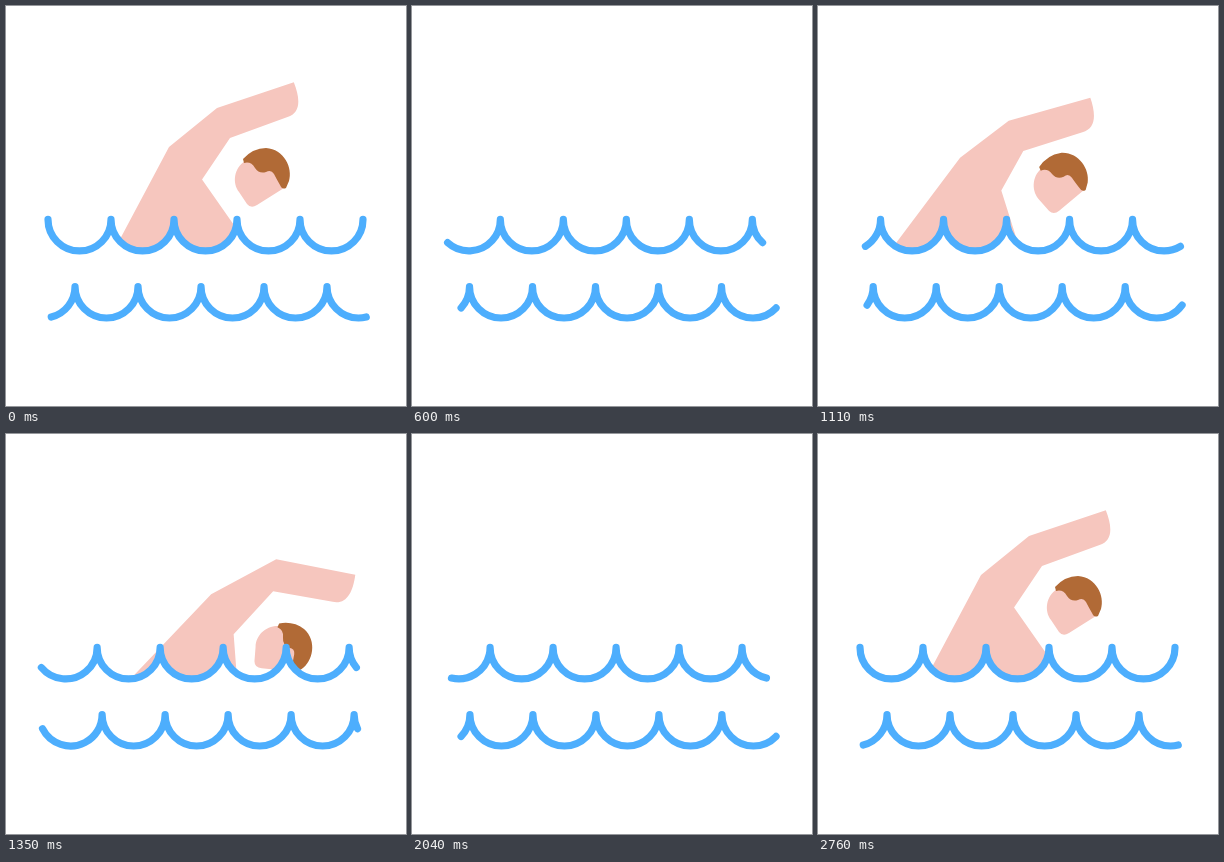
Write an HTML page with a canvas that moves like this. It is 400 px wide and 400 px high and loops after 4790 ms.

```html
<!DOCTYPE html>
<html lang="en">
<head>
<meta charset="utf-8">
<title>Swimmer</title>
<style>
  html, body { margin: 0; width: 100%; height: 100%; overflow: hidden; background: #fff; }
  canvas { display: block; width: 400px; height: 400px; }
</style>
</head>
<body>
<canvas id="stage" width="400" height="400"></canvas>
<script>
const ctx = document.getElementById('stage').getContext('2d');
const LOOP = 4790, STEP = 30, LAST = 92;
const BLUE = '#4daefd', SKIN = '#f6c6be', HAIR = '#b16a36';
const R = 31.5, PITCH = 2 * R, SCALLOPS = 5;
const RISE = -66, DIVE = 47;
const rad = deg => deg * Math.PI / 180;
const frac = v => v - Math.floor(v);

// Monotone cubic through a few [x, y] points
function through(...pts) {
  const slope = i => (pts[i + 1][1] - pts[i][1]) / (pts[i + 1][0] - pts[i][0]);
  const tangent = i => {
    if (i === 0) return slope(0);
    if (i === pts.length - 1) return slope(i - 1);
    const a = slope(i - 1), b = slope(i);
    return a * b > 0 ? 2 * a * b / (a + b) : 0;
  };
  return x => {
    let i = 0;
    while (i < pts.length - 2 && x > pts[i + 1][0]) i++;
    const [x0, y0] = pts[i], [x1, y1] = pts[i + 1];
    const h = x1 - x0, t = (x - x0) / h, q = 1 - t;
    return y0 * q * q * (1 + 2 * t) + y1 * t * t * (3 - 2 * t)
         + h * t * q * (tangent(i) * q - tangent(i + 1) * t);
  };
}

// Scallops travelled: both waves slow down, the lower one overshoots
const upperTravel = through([0, 0], [12, 1.43], [28, 3], [45, 4.22], [57, 5.02], [77, 5.68], [92, 6]);
const lowerTravel = through([0, 0], [12, 1.43], [28, 2.78], [45, 3.57], [57, 4.19], [77, 4.15], [92, 4]);

// Two strokes, slowing at the end; result in -180..180 degrees, 0 = arm highest
function strokeAngle(s) {
  const deg = 720 * s + 450 * s * s * (1 - s);
  return (deg + 180) % 360 - 180;
}

// Circular swing a + b cos + c sin with given values at RISE, 0 and DIVE
function swing(rise, high, dive) {
  const c1 = Math.cos(rad(RISE)) - 1, s1 = Math.sin(rad(RISE));
  const c2 = Math.cos(rad(DIVE)) - 1, s2 = Math.sin(rad(DIVE));
  const det = c1 * s2 - c2 * s1;
  const b = ((rise - high) * s2 - (dive - high) * s1) / det;
  const c = ((dive - high) * c1 - (rise - high) * c2) / det;
  return deg => high + b * (Math.cos(rad(deg)) - 1) + c * Math.sin(rad(deg));
}
const orbit = (xs, ys) => {
  const x = swing(...xs), y = swing(...ys);
  return deg => [x(deg), y(deg)];
};

const shoulderAt = orbit([127, 163, 205], [190, 141, 160]);
const elbowAt = orbit([190, 211, 270], [161, 102, 125]);
const innerAt = orbit([196, 224, 267], [193, 132, 157]);
const headAt = orbit([213, 237, 273], [206, 153, 189]);
const forearm = swing(12.4, -18.5, 10.7);
const reach = swing(93, 81, 80.5);
const tilt = swing(4, 0, 38);

// Point at a distance along a direction and across it
function offset([x, y], deg, along, across = 0) {
  const c = Math.cos(rad(deg)), s = Math.sin(rad(deg));
  return [x + c * along - s * across, y + s * along + c * across];
}

function scallop(left, y, from, to) {
  ctx.arc(left + R, y, R, Math.PI * (1 - from), Math.PI * (1 - to), true);
}

function wave(x, y, u) {
  const left = x - PITCH * u;
  ctx.beginPath();
  scallop(left, y, u, 1);
  for (let k = 1; k < SCALLOPS; k++) scallop(left + k * PITCH, y, 0, 1);
  scallop(left + SCALLOPS * PITCH, y, 0, u);
  ctx.lineWidth = 7.2;
  ctx.lineCap = ctx.lineJoin = 'round';
  ctx.strokeStyle = BLUE;
  ctx.stroke();
}

function clipAboveWave(x, y, u) {
  const left = x - PITCH * u;
  ctx.beginPath();
  ctx.moveTo(left - PITCH, 0);
  for (let k = -1; k < 7; k++) scallop(left + k * PITCH, y, 0, 1);
  ctx.lineTo(left + 7 * PITCH, 0);
  ctx.clip();
}

function fillPath(color, path) {
  ctx.fillStyle = color;
  ctx.fill(path);
}

const face = new Path2D('M239 155C228 162 226 177 233 186L241 198Q245 203 251 199L278 182L270 158Z');
const hair = new Path2D('M237 153Q247 142 260 142C278 143 287 162 283 175L280 182Q276 184 274 179' +
  'Q270 172 268 168Q265 163 260 166Q253 168 249 162Q245 155 238 157Z');

function head([x, y], deg) {
  ctx.save();
  ctx.translate(x, y);
  ctx.rotate(rad(deg));
  ctx.translate(-237, -153);
  fillPath(SKIN, face);
  fillPath(HAIR, hair);
  ctx.restore();
}

function swimmer(a) {
  const lean = Math.abs(a);
  const shoulder = shoulderAt(a), elbow = elbowAt(a), inner = innerAt(a);
  // Past the dive everything ahead of the shoulder plunges deeper
  const plunge = Math.max(0, a - DIVE) * 0.012;
  const sink = ([x, y]) => [x, y + plunge * Math.max(0, x - shoulder[0])];

  const arm = forearm(a);
  const tip = offset(elbow, arm, reach(a));
  const palm = offset(tip, arm, -17, 31);
  const armpit = offset(inner, 124 + 0.18 * a, 50 + 0.18 * a);
  const waistRight = offset(armpit, 55 + 0.65 * lean, 100);
  const waistLeft = offset(shoulder, 118 + 0.33 * lean, 160);

  ctx.translate(0, Math.max(0, lean - 75) * 0.4);
  head(sink(headAt(a)), tilt(a));

  const body = new Path2D();
  const lineTo = p => body.lineTo(...sink(p));
  [shoulder, elbow, tip].forEach(lineTo);
  body.bezierCurveTo(...sink(offset(tip, arm, 1, 18)), ...sink(offset(palm, arm, 14)), ...sink(palm));
  [inner, armpit, waistRight, waistLeft].forEach(lineTo);
  fillPath(SKIN, body);
}

function draw(ms) {
  const n = Math.min(LAST, Math.floor(ms / STEP));
  const upper = frac(upperTravel(n));
  const lower = frac(0.579 + lowerTravel(n));
  ctx.fillStyle = '#fff';
  ctx.fillRect(0, 0, 400, 400);
  ctx.save();
  clipAboveWave(42, 213.4, upper);
  swimmer(strokeAngle(n / LAST));
  ctx.restore();
  wave(42, 213.4, upper);
  wave(42.5, 280.5, lower);
}

const start = performance.now();
function tick() {
  draw((performance.now() - start) % LOOP);
  requestAnimationFrame(tick);
}
tick();
</script>
</body>
</html>
```
